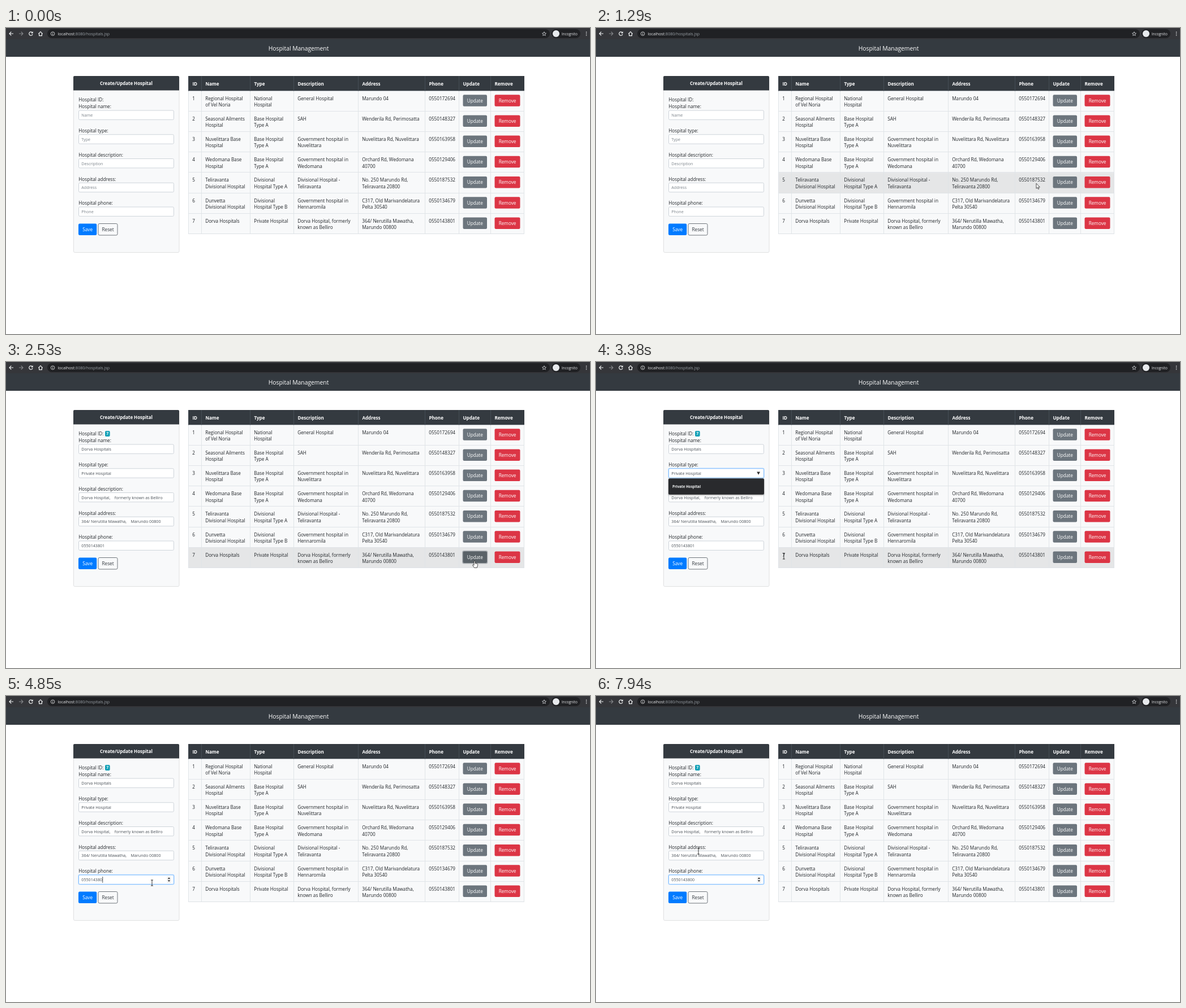
These frames come from a looping animation (1032x542 px, 8000 ms). An HTML page with a canvas:

```html
<!DOCTYPE html>
<html lang="en">
<head>
<meta charset="utf-8">
<title>Hospital Management</title>
<style>
html, body { margin: 0; width: 100%; height: 100%; overflow: hidden; background: #fff; }
canvas { display: block; }
</style>
</head>
<body>
<canvas id="stage" width="1032" height="542"></canvas>
<script>
const ctx = document.getElementById('stage').getContext('2d');
const LOOP = 8000, STEP = 93.7, START = 350;

const columns = [322.5, 345.5, 431.5, 508.5, 622.5, 740.5, 800.5, 856.5, 915.5];
const headings = ['ID', 'Name', 'Type', 'Description', 'Address', 'Phone', 'Update', 'Remove'];
const ROW_TOP = 111.5, ROW_HEIGHT = 36.2;
const rows = [
  ['1', 'Regional Hospital|of Vel Noria', 'National|Hospital', 'General Hospital', 'Marundo 04', '0550172694'],
  ['2', 'Seasonal Ailments|Hospital', 'Base Hospital|Type A', 'SAH', 'Wenderila Rd, Perimosatta', '0550148327'],
  ['3', 'Nuvelittara Base|Hospital', 'Base Hospital|Type A', 'Government hospital in|Nuvelittara', 'Nuvelittara Rd, Nuvelittara', '0550163958'],
  ['4', 'Wedomana Base|Hospital', 'Base Hospital|Type A', 'Government hospital in|Wedomana', 'Orchard Rd, Wedomana|40700', '0550129406'],
  ['5', 'Teliravanta|Divisional Hospital', 'Divisional|Hospital Type A', 'Divisional Hospital -|Teliravanta', 'No. 250 Marundo Rd,|Teliravanta 20800', '0550187532'],
  ['6', 'Dunvetta|Divisional Hospital', 'Divisional|Hospital Type B', 'Government hospital in|Hennaromila', 'C317, Old Marivandelatura|Pelta 30540', '0550134679'],
  ['7', 'Dorva Hospitals', 'Private Hospital', 'Dorva Hospital, formerly|known as Belliro', '364/ Nerutilla Mawatha,|Marundo 00800', '0550143801']
];

const fields = ['Name', 'Type', 'Description', 'Address', 'Phone'];
const filled = ['Dorva Hospitals', 'Private Hospital', 'Dorva Hospital,    formerly known as Belliro',
  '364/ Nerutilla Mawatha,    Marundo 00800'];
const FIELD_X = 128.5, FIELD_W = 168, FIELD_H = 16.4;
const fieldY = i => 146 + i * 42.75;

// Form timeline
const FILL = 2420, TYPE_FOCUS = 2620, PHONE_FOCUS = 4020;
const typing = [[0, '0550143801'], [4850, '055014380'], [5020, '05501438'], [6620, '055014380'], [7190, '0550143800']];
const caretSwitches = [[TYPE_FOCUS, 1], [3150, 0], [3690, 1], [PHONE_FOCUS, 1], [4560, 0], [4850, 1],
  [5580, 0], [6050, 1], [7090, 0], [7190, 1], [7740, 0]];

// Pointer path: time, x, y, shape
const path = [
  [350, 969, 534, 'arrow'], [630, 860, 402, 'arrow'], [830, 778, 306, 'arrow'], [1005, 755, 275, 'arrow'],
  [1099, 756, 252, 'arrow'], [1190, 762, 252, 'arrow'], [1390, 795, 300, 'arrow'], [1568, 819, 337, 'hand'],
  [1755, 828, 348, 'hand'], [2100, 828, 348, 'hand'], [2220, 828, 352, 'hand'], [2850, 828, 352, 'hand'],
  [2960, 800, 350, 'arrow'], [3348, 332, 344, 'ibeam'], [3440, 319, 344, 'arrow'], [3629, 291, 341, 'arrow'],
  [3910, 258, 329, 'ibeam'], [4379, 258, 331, 'ibeam'], [7760, 258, 331, 'ibeam'], [7938, 181, 275, 'ibeam']
];

const latest = (list, t) => list.findLast(item => item[0] <= t);

function pointerAt(time) {
  if (time < START) return null;
  const t = START + STEP * Math.floor((time - START) / STEP);
  const i = path.findLastIndex(p => p[0] <= t);
  const a = path[i], b = path[i + 1] || a;
  const k = a === b ? 0 : (t - a[0]) / (b[0] - a[0]);
  return { x: a[1] + (b[1] - a[1]) * k, y: a[2] + (b[2] - a[2]) * k, shape: a[3] };
}

const inside = (p, x, y, w, h) => p && p.x >= x && p.x <= x + w && p.y >= y && p.y <= y + h;

function text(str, x, y, size = 8.2, color = '#212529', weight = 400, align = 'left') {
  ctx.font = `${weight} ${size}px "Open Sans", sans-serif`;
  ctx.textAlign = align;
  ctx.fillStyle = color;
  ctx.fillText(str, x, y);
}

function box(x, y, w, h, fill, stroke, radius = 0, line = 1) {
  ctx.beginPath();
  ctx.roundRect(x, y, w, h, radius);
  if (fill) { ctx.fillStyle = fill; ctx.fill(); }
  if (stroke) { ctx.strokeStyle = stroke; ctx.lineWidth = line; ctx.stroke(); }
}

function shape(d, fill, stroke, x = 0, y = 0, line = 1) {
  const p = new Path2D(d);
  ctx.save();
  ctx.translate(x, y);
  if (fill) { ctx.fillStyle = fill; ctx.fill(p); }
  if (stroke) { ctx.strokeStyle = stroke; ctx.lineWidth = line; ctx.stroke(p); }
  ctx.restore();
}

function button(label, x, y, w, fill, color = '#fff', stroke) {
  box(x, y, w, 20.5, fill, stroke, 2.2);
  text(label, x + w / 2, y + 13.4, 8.2, color, 400, 'center');
}

function drawBrowser() {
  box(0, 0, 1032, 20, '#35363a');
  box(73, 2, 888, 16, '#202124', null, 8);
  box(964, 2, 51, 16, '#202124', null, 8);
  const light = '#f1f3f4';
  shape('M13 10H6M9.3 6.7L6 10L9.3 13.3', null, light, 0, 0, 1.2);
  shape('M23 10H30M26.7 6.7L30 10L26.7 13.3', null, '#85878a', 0, 0, 1.2);
  shape('M46.4 8A3.2 3.2 0 1 0 47 11', null, light, 0, 0, 1.2);
  shape('M47.6 6V9.4H44.2Z', light);
  shape('M57.3 10.3L61 6.6L64.7 10.3M58.6 9.5V13.6H63.4V9.5', null, light, 0, 0, 1.2);
  box(79.3, 6.8, 6.6, 6.6, null, light, 3.3, .8);
  shape('M82.6 8.2V9.2M82.6 9.9V12', null, light, 0, 0, .9);
  text('localhost', 91.5, 12.8, 7.1, '#e8eaed');
  text(':8080/hospitals.jsp', 91.5 + ctx.measureText('localhost').width, 12.8, 7.1, '#9aa0a6');
  shape('M0 -3.5L1 -1.1L3.5 -.9L1.6 .8L2.2 3.2L0 1.9L-2.2 3.2L-1.6 .8L-3.5 -.9L-1 -1.1Z', null, '#dadce0', 951, 10.2, .8);
  box(966, 4, 12, 12, '#e8eaed', null, 6);
  text('Incognito', 982, 12.5, 6.4, '#e8eaed');
  for (const y of [6.6, 9.4, 12.2]) box(1024.8, y, 1.6, 1.6, light, null, .8);
  box(0, 20, 1032, 31, '#343a40');
  text('Hospital Management', 517, 40, 10.35, '#fff', 400, 'center');
}

function drawTable(pointer, t) {
  const left = columns[0], right = columns[8], bottom = ROW_TOP + ROW_HEIGHT * rows.length;
  box(left, 85, right - left, bottom - 85, '#f8f9fa');
  rows.forEach((row, r) => {
    const y = ROW_TOP + r * ROW_HEIGHT;
    if (inside(pointer, left, y, right - left, ROW_HEIGHT - .01)) box(left, y, right - left, ROW_HEIGHT, '#e5e6e7');
    box(left, Math.round(y) - .5, right - left, 0, null, '#e0e4e8', 0, .8);
    row.forEach((cell, c) => cell.split('|').forEach((line, n) =>
      text(line, columns[c] + 6.7, y + 16 + n * 11.5)));
  });
  for (const x of columns) box(x, ROW_TOP, 0, bottom - ROW_TOP, null, '#e0e4e8', 0, .8);
  box(left, Math.round(bottom) - .5, right - left, 0, null, '#dee2e6');
  box(left - .5, 85, right - left + 1, 26.3, '#343a40');
  headings.forEach((name, c) => {
    text(name, columns[c] + 6.9, 101.8, 8.1, '#fff', 700);
    box(columns[c], 85, 0, 26.3, null, '#454d55');
  });
  rows.forEach((row, r) => {
    const y = ROW_TOP + 6.7 + r * ROW_HEIGHT;
    const hover = inside(pointer, 807.5, y, 42.5, 20.5) && t > 1600;
    if (r === 6 && t >= FILL && t < TYPE_FOCUS) box(806.2, y - 1.5, 45.1, 23.5, 'rgba(108,117,125,.5)', null, 3);
    button('Update', 807.5, y, 42.5, hover ? '#5a6268' : '#6c757d');
    button('Remove', 863.5, y, 45, '#dc3545');
  });
}

function drawForm(pointer, t) {
  const isFilled = t >= FILL;
  const focus = t >= PHONE_FOCUS ? 4 : t >= TYPE_FOCUS ? 1 : -1;
  const caretOn = latest(caretSwitches, t)?.[1];

  box(119.5, 85.5, 186.5, 312, '#f8f9fa', '#dfe0e1', 2);
  box(119, 85, 187, 25.5, '#343a40', null, [2, 2, 0, 0]);
  text('Create/Update Hospital', 212.5, 101.2, 7.9, '#fff', 700, 'center');
  text('Hospital ID:', 128.3, 129.7);
  if (isFilled) {
    box(175, 122, 8.7, 10, '#17a2b8', null, 2);
    text('7', 179.3, 129.4, 6.4, '#fff', 700, 'center');
  }

  fields.forEach((name, i) => {
    const y = fieldY(i), focused = i === focus;
    const value = i === 4 ? latest(typing, t)[1] : filled[i];
    text(`Hospital ${name.toLowerCase()}:`, 128.3, y - 3.7);
    if (focused) box(FIELD_X - 1.2, y - 1.2, FIELD_W + 2.4, FIELD_H + 2.4, '#bfdeff', null, 3);
    box(FIELD_X, y, FIELD_W, FIELD_H, '#fff', focused ? '#80bdff' : '#ced4da', 2);
    text(isFilled ? value : name, 133.3, y + 11, 7.15, isFilled ? '#495057' : '#7b838a');
    if (focused && caretOn) box(133.6 + ctx.measureText(value).width, y + 3, .9, 10.8, '#343a40');
    if (i === 4 && (focused || inside(pointer, FIELD_X, y, FIELD_W, FIELD_H))) {
      box(284.5, y + 2.5, 7, 11.5, '#efefef');
      shape('M285.8 -1.2L288 -3.8L290.2 -1.2ZM285.8 1.2L288 3.8L290.2 1.2Z', '#333', null, 0, y + 8.1);
    }
  });

  if (focus === 1) {
    shape('M284.2 194.5H290L287.1 199.7Z', '#333');
    ctx.save();
    ctx.shadowColor = 'rgba(0,0,0,.4)';
    ctx.shadowBlur = 3;
    ctx.shadowOffsetY = 1;
    box(128, 206.3, 169, 28.4, '#292a2d', null, 2);
    ctx.restore();
    text('Private Hospital', 135, 222.8, 6.25, '#f1f3f4', 700);
  }

  button('Save', 128, 346.5, 32.3, '#007bff');
  button('Reset', 163, 346.5, 34, null, '#343a40', '#70767c');
}

function drawPointer(p) {
  if (!p) return;
  if (p.shape === 'arrow') shape('M0 0V9L2 7.2L3.5 10.2L4.9 9.6L3.5 6.6H6.3Z', '#fff', '#222', p.x, p.y, .8);
  if (p.shape === 'hand') {
    shape('M-1 .8Q0 -.6 1 .8V4.6L4.8 5.4Q5.8 5.8 5.6 7.5L4.3 12.4H-.4L-3.4 8.2Q-3.4 6.7 -2.2 7L-1 8.2Z',
      '#fff', '#222', p.x, p.y, .8);
  }
  if (p.shape === 'ibeam') shape('M-2 -5H2M0 -5V5M-2 5H2', null, '#222', p.x, p.y, .9);
}

function frame(now) {
  const t = now % LOOP, pointer = pointerAt(t);
  box(0, 0, 1032, 542, '#fff');
  drawBrowser();
  drawTable(pointer, t);
  drawForm(pointer, t);
  drawPointer(pointer);
  requestAnimationFrame(frame);
}
requestAnimationFrame(frame);
</script>
</body>
</html>
```
